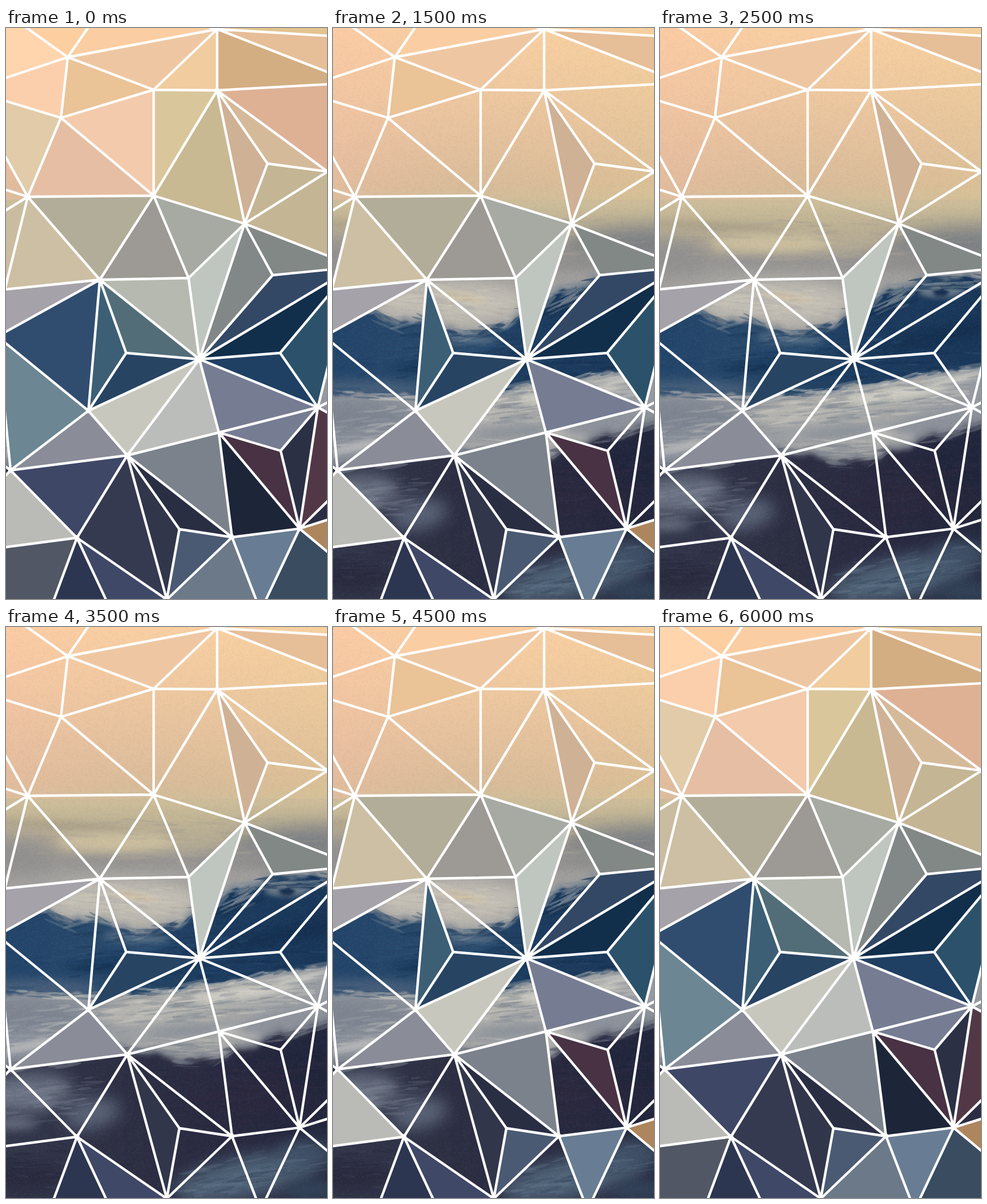
An HTML page with a canvas that plays this animation: 561 px wide and 998 px high, repeating every 6.5 s.

```html
<!DOCTYPE html>
<html lang="en">
<head>
<meta charset="utf-8">
<title>Mosaic seascape</title>
<style>
  html, body { margin: 0; width: 561px; height: 998px; overflow: hidden; background: #fff; }
  canvas, svg { position: absolute; left: 0; top: 0; width: 561px; height: 998px; display: block; }
</style>
</head>
<body>
<canvas id="paint" width="561" height="998"></canvas>
<svg id="mesh" viewBox="0 0 561 998"></svg>
<script>
const W = 561, H = 998, STEP = 500, STEPS = 13;

// ---- painting ----
const ctx = document.getElementById('paint').getContext('2d');
let seed = 7;
const rnd = () => (seed = (seed * 16807) % 2147483647) / 2147483647;
const spread = r => (rnd() + rnd() - 1) * r;

function gradient(x, y, ...colors) {
  const g = ctx.createLinearGradient(0, 0, x, y);
  colors.forEach((c, i) => {
    const [at, color] = Array.isArray(c) ? c : [i / (colors.length - 1), c];
    g.addColorStop(at, color);
  });
  return g;
}

// Height of a smooth ridge through a few points
function heightAt(pts, x) {
  let i = 1;
  while (i < pts.length - 1 && pts[i][0] < x) i++;
  const [x0, y0] = pts[i - 1], [x1, y1] = pts[i];
  const u = (1 - Math.cos(Math.PI * Math.min(1, Math.max(0, (x - x0) / (x1 - x0))))) / 2;
  return y0 + (y1 - y0) * u;
}

function soft(blur, fill, draw) {
  ctx.filter = `blur(${blur}px)`;
  ctx.fillStyle = fill;
  ctx.beginPath();
  draw();
  ctx.fill();
  ctx.filter = 'none';
}

function ridge(pts, fill, rough, blur, shift = 0) {
  soft(blur, fill, () => {
    ctx.moveTo(-40, H + 40);
    for (let x = -40; x <= W + 40; x += 4) {
      const wave = Math.sin(x * .09) + Math.sin(x * .23 + 1) * .6 + spread(.5);
      ctx.lineTo(x, heightAt(pts, x) + shift + wave * rough);
    }
    ctx.lineTo(W + 40, H + 40);
  });
}

function blob(x, y, rx, ry, color, blur, tilt = 0) {
  soft(blur, color, () => ctx.ellipse(x, y, rx, ry, tilt, 0, 7));
}

function dab(x, y, tilt, color) {
  ctx.fillStyle = color;
  ctx.beginPath();
  ctx.ellipse(x, y, 8 + rnd() * 24, .8 + rnd() * 2.6, tilt + spread(.16), 0, 7);
  ctx.fill();
}

// Scattered thin brush strokes
function dabs(x, y, rx, ry, count, colors, alpha, tilt = 0) {
  ctx.globalAlpha = alpha;
  for (let i = 0; i < count; i++) {
    const dx = spread(rx);
    dab(x + dx, y + spread(ry) + dx * tilt, tilt, colors[i % colors.length]);
  }
  ctx.globalAlpha = 1;
}

// Strokes that break up the edge of a ridge
function fray(pts, count, depth, colors, alpha) {
  ctx.globalAlpha = alpha;
  for (let i = 0; i < count; i++) {
    const x = rnd() * W, y = heightAt(pts, x);
    dab(x, y + spread(depth), Math.atan((heightAt(pts, x + 8) - y) / 8), colors[i % colors.length]);
  }
  ctx.globalAlpha = 1;
}

function paintSky() {
  ctx.fillStyle = gradient(0, H, [0, '#fad0a2'], [.1, '#efc9a0'], [.2, '#e2c09d'], [.27, '#d6ba98'],
    [.31, '#cbbc99'], [.34, '#beb294'], [.385, '#b1a894'], [.41, '#9c9a98'], [.44, '#a3a19e'], [.53, '#b2afa9']);
  ctx.fillRect(0, 0, W, H);
  ctx.fillStyle = gradient(W, 0, 'rgba(255,192,168,.3)', 'rgba(240,200,160,.1)', 'rgba(232,208,145,.25)');
  ctx.fillRect(0, 0, W, 300);

  blob(520, 380, 130, 32, '#7c8084', 16, -.06);
  blob(400, 405, 80, 16, '#908f8e', 10, -.1);
  blob(20, 400, 70, 34, '#92908f', 16);
  blob(210, 410, 150, 9, '#969391', 7);
  blob(110, 347, 130, 5, '#a59c86', 6, .05);
  blob(195, 376, 105, 15, '#cbbf9f', 8);
  blob(205, 478, 130, 34, '#c1bdb4', 12);
  blob(225, 470, 42, 6, '#d4c4a6', 4, .15);
  dabs(300, 370, 300, 50, 110, ['#8e8e8c', '#b3a992', '#c3b798'], .14);
  dabs(200, 480, 140, 30, 80, ['#d3cdbf', '#a6a5a4', '#c9c2b4'], .25, .05);
}

function paintWave() {
  const crest = [[-40, 515], [0, 507], [70, 500], [110, 518], [160, 512], [195, 530], [245, 538],
    [300, 522], [345, 494], [400, 460], [470, 440], [530, 436], [601, 446]];
  ridge(crest, 'rgba(125,134,146,.7)', 3, 5, -10);
  ridge(crest, gradient(W, 0, '#23456a', '#29496a', '#1c3b5e', '#193759'), 3, 2);
  blob(230, 543, 60, 9, '#5b7389', 7, .05);
  blob(45, 632, 120, 16, '#48607b', 10);
  blob(500, 535, 130, 12, '#142e4e', 9, -.2);
  blob(230, 592, 130, 14, '#173758', 9);
  fray(crest, 70, 12, ['#8f989f', '#274666', '#667a8d', '#1c3a5c'], .4);
  dabs(280, 570, 330, 55, 200, ['#163659', '#2f5376', '#1f456e', '#122c4b'], .28, -.06);
  dabs(410, 478, 42, 26, 36, ['#6d7d8d', '#8a949d', '#142e4d'], .4, -.5);
  blob(490, 461, 38, 10, '#6a7a89', 5);
  blob(491, 461, 14, 9, '#172f4d', 3);
  dabs(500, 450, 70, 12, 30, ['#7b8993', '#2a4462'], .4);
}

function paintFoam() {
  const rim = [[-40, 642], [60, 640], [144, 642], [240, 640], [300, 633], [340, 624], [400, 620],
    [450, 606], [520, 597], [601, 586]];
  ridge(rim, gradient(W, 0, '#868c97', '#9a9da1', '#a9aaa8', '#9599a0'), 2.5, 2);
  blob(60, 680, 85, 24, '#7d8490', 12);
  blob(410, 640, 90, 11, '#cfcdc4', 6, -.12);
  blob(520, 612, 50, 7, '#c4c4bf', 5, -.2);
  blob(245, 672, 80, 20, '#b6b5b0', 8, -.08);
  blob(330, 705, 80, 10, '#8c929a', 7, -.1);
  blob(60, 728, 90, 7, '#bebebe', 6, -.2);
  blob(405, 708, 40, 8, '#bdbcb6', 6, .1);
  blob(490, 690, 90, 18, '#8c919a', 9, -.15);
  fray(rim, 60, 10, ['#c9c8c1', '#27476a', '#8a939c'], .4);
  dabs(330, 660, 250, 38, 180, ['#d6d3c9', '#8c929a', '#bfbdb6', '#747e8a'], .3, -.1);
  dabs(70, 705, 100, 45, 70, ['#a8abb0', '#757d8a', '#c6c6c4'], .25, -.15);
  dabs(310, 735, 110, 20, 50, ['#b4b4b2', '#7b828d'], .35);
}

function paintDepths() {
  const shelf = [[-40, 780], [60, 764], [212, 742], [260, 748], [320, 760], [372, 754], [410, 740],
    [480, 714], [601, 688]];
  ridge(shelf, 'rgba(95,102,118,.6)', 3, 6, -10);
  ridge(shelf, gradient(W, 0, '#34384c', '#2d2f43', '#292a40', '#23273d'), 3, 4);
  blob(40, 815, 75, 32, '#6d7585', 14, -.1);
  blob(150, 850, 50, 26, '#5a6377', 14, -.2);
  blob(15, 868, 40, 10, '#666e7e', 8);
  blob(450, 815, 110, 20, '#2d283d', 18, -.12);
  blob(530, 770, 50, 40, '#20253b', 16);
  blob(420, 962, 130, 34, '#52667a', 16, -.2);
  blob(525, 920, 50, 22, '#405268', 14);
  blob(535, 985, 50, 18, '#33445a', 12);
  blob(30, 960, 70, 28, '#292a3e', 14);
  fray(shelf, 60, 12, ['#8b9099', '#34384d', '#666c7b'], .35);
  dabs(70, 825, 100, 45, 80, ['#828997', '#4f566a', '#626a7b'], .25, -.1);
  dabs(430, 800, 180, 75, 110, ['#20243a', '#33293f', '#2c3149'], .28, -.12);
  dabs(430, 955, 150, 40, 90, ['#64788b', '#2f3d55', '#4a5d72'], .28, -.15);
  dabs(110, 945, 140, 42, 50, ['#34364b', '#222539', '#3e4358'], .3);
}

function weave() {
  for (let y = 0; y < H; y += 3)
    for (let x = (y / 3 % 2) * 2; x < W; x += 4) {
      const a = rnd() * .045;
      ctx.fillStyle = rnd() < .5 ? `rgba(255,250,235,${a})` : `rgba(30,25,35,${a})`;
      ctx.fillRect(x, y, 2, 2);
    }
}

// ---- mesh: inner points, and border points on or just off the stage ----
const inner = {
  A: [108, 51], B: [369, 2], C: [258, 108], D: [96, 157], E: [38, 295], F: [258, 293], G: [369, 109],
  H: [457, 237], I: [417, 342], J: [164, 440], K: [319, 437], L: [338, 579], M: [466, 432], N: [210, 568],
  O: [144, 669], P: [212, 747], Q: [372, 707], R: [479, 568], S: [545, 663], T: [480, 739], U: [513, 875],
  V: [395, 890], W: [303, 876], Y: [124, 891], Z: [8, 773]
};
const border = {
  a: [-6, 89], b: [-6, 126], c: [-6, 216], d: [-6, 281], e: [-6, 322], f: [-2, 457], g: [-15, 539],
  i: [-6, 763], j: [-6, 788], k: [-6, 908], l: [82, 1004], m: [177, 1004], X: [281, 999], n: [439, 1004],
  o: [452, 1004], p: [567, 920], q: [567, 858], r: [567, 822], s: [567, 675], t: [567, 652], u: [567, 574],
  v: [567, 463], w: [567, 442], x: [567, 422], y: [567, 400], z: [562, 251], 1: [567, 98], 2: [567, 79],
  3: [567, 14], 4: [147, -6], 5: [28, -6], 6: [-6, -6], 7: [567, -6], 8: [567, 1004], 9: [-6, 1004],
  0: [330, -8], '+': [385, -8]
};
const points = { ...inner, ...border };

// Faces grouped by the last depth at which they are still covered
const faces = [
  `B+73 e3c390, B21G d3ae82, AabD fbcfac, DCF f3caab, DEF e6bea3, CGF dac69b, GHz d5ba9a, IML 828887,
   JgO 304d70, LPQ bbbdba, QTS 767d92, kYl9 525765, VXn 6b7989`,
  `a65A ffd5ae, A54 fdcfa0, bDEc e1cba9, Gz1 deb195, HIz c4b594, JKL b6b9af, LRS 1f4063, TSU 2b3044,
   ZPY 3f4766, Uo8p 394c60`,
  `BCG f0cc9e, GFI c8b993, Izy c4b595, Eef c9bca0, JNL 526d78, OgZ 6c8693, SUrs 523846, QUV 1d2538,
   PYX 363a50, Uqr 2a2d43`,
  `A40B fbcda2, ADC eac397, EfJ ccbfa3, FKJ 9d9994, MLwx 334865, RSuv 2c526b, OLP c8c7be, LQS 767d92,
   PWV 2a2e43, WXV 4b5a73, VnoU 687d93`,
  `EFJ b2ad99, FKI a7aaa3, LRvw 112e4b, JNO 3c5f76, QTU 483244, PQV 7b828b, ZYkj babbb6, Upq ad865d`,
  `ABC eec7a2, B32 e6be98, GHI cfb195, IKL bfc5bf, IMxy 828886, NOL 284463, Jfg a5a3a9, ZOP 8a8c98,
   PWX 31364a, Ylm 2c3650, YmX 404867`,
  `Zij 2c2f48, Ecd none, Ede none, Sut none, Sts none`
];

const svg = document.getElementById('mesh');
function add(parent, tag, attrs) {
  const el = document.createElementNS('http://www.w3.org/2000/svg', tag);
  for (const k in attrs) el.setAttribute(k, attrs[k]);
  return parent.appendChild(el);
}

const edges = new Set();
const layers = faces.map(list => {
  const group = add(svg, 'g', {});
  for (const item of list.split(',')) {
    const [names, color] = item.trim().split(' ');
    const ids = [...names];
    ids.forEach((id, n) => {
      const next = ids[(n + 1) % ids.length];
      if (inner[id] || inner[next]) edges.add([id, next].sort().join(''));
    });
    if (color !== 'none')
      add(group, 'polygon', { points: ids.map(id => points[id]).join(' '), fill: '#' + color });
  }
  return group;
});

const path = [...edges].map(e => `M${points[e[0]]}L${points[e[1]]}`).join('');
add(svg, 'path', { d: path, fill: 'none', stroke: '#fff', 'stroke-width': 4.4, 'stroke-linecap': 'round' });
for (const id of 'BEFGIJLOPSUVYZ') {
  const [cx, cy] = points[id];
  add(svg, 'circle', { cx, cy, r: id === 'L' ? 6 : 4.4, fill: '#fff' });
}

// ---- uncover the painting step by step, then cover it again ----
let shown = -1;
function tick() {
  const step = Math.floor(performance.now() / STEP) % STEPS;
  const depth = Math.min(step, STEPS - 1 - step);
  if (depth !== shown) {
    shown = depth;
    layers.forEach((g, last) => g.setAttribute('visibility', depth <= last ? 'visible' : 'hidden'));
  }
  requestAnimationFrame(tick);
}

paintSky();
paintWave();
paintFoam();
paintDepths();
weave();
tick();
</script>
</body>
</html>
```
